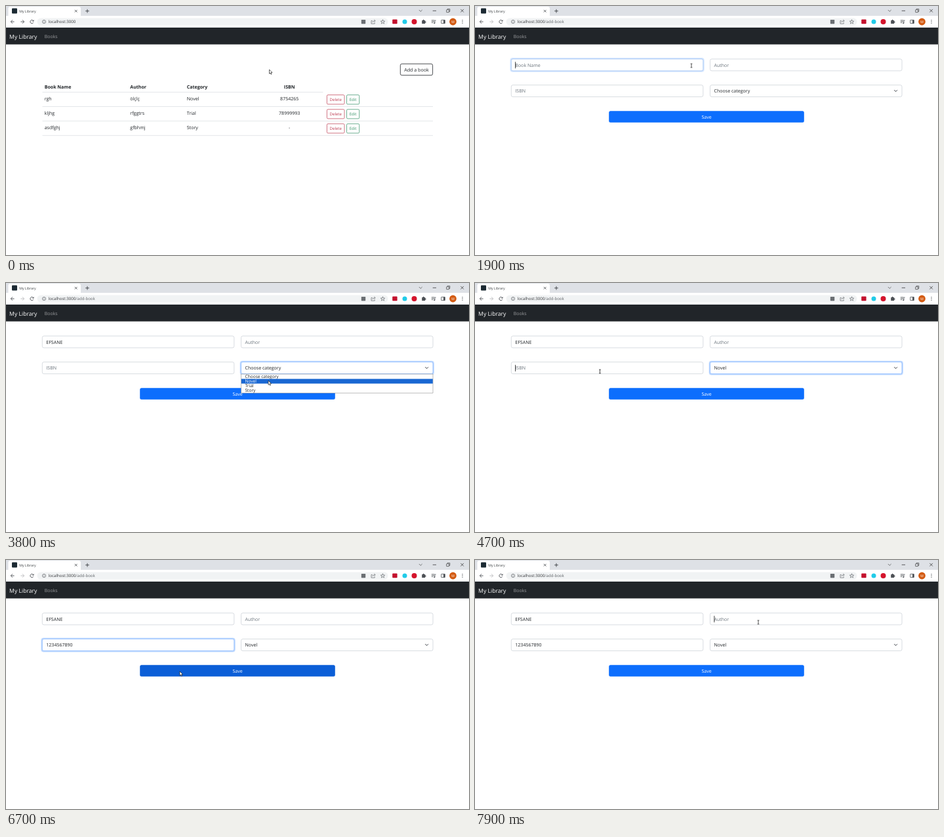
An HTML page with a canvas that plays this animation: 706 by 380 pixels, repeating every 8000 ms.

```html
<!DOCTYPE html>
<html lang="en">
<head>
<meta charset="utf-8">
<title>My Library</title>
<style>
html, body { margin: 0; width: 100%; height: 100%; overflow: hidden; background: #fff; }
canvas { display: block; width: 706px; height: 380px; }
</style>
</head>
<body>
<canvas id="stage"></canvas>
<script>
const W = 706, H = 380, LOOP = 8000, STEP = 100;
const canvas = document.getElementById('stage');
const ctx = canvas.getContext('2d');
const ratio = window.devicePixelRatio || 1;
canvas.width = W * ratio;
canvas.height = H * ratio;

const INK = '#212529', MUTED = '#6c757d', BLUE = '#0d6efd', ICON = '#5f6368';
const BODY = 7.05;

const BOOKS = [
  ['rgh', 'ölçlç', 'Novel', '8754265'],
  ['kljhg', 'rfggtrs', 'Trial', '78999993'],
  ['asdfghj', 'gfbhmj', 'Story', '-']
];
const OPTIONS = ['Choose category', 'Novel', 'Trial', 'Story'];

// time, x, y of the pointer
const PATH = [
  [0, 401.5, 97], [600, 401.5, 97], [1000, 630.5, 98], [1300, 630.5, 98],
  [1500, 592, 95], [1900, 330, 91], [2600, 330, 91], [3200, 389, 138],
  [3500, 405, 132], [3800, 400, 149], [4300, 400, 149], [4700, 190.5, 135],
  [6300, 190.5, 135], [6700, 265, 170], [6800, 265, 168], [7000, 262.5, 48],
  [7200, 340, 60], [7500, 432, 77], [7600, 432, 78], [7800, 432, 95]
];
const NAME_KEYS = [2000, 2100, 2200, 2300, 2400, 2500];
const ISBN_KEYS = [5100, 5100, 5100, 5100, 5300, 5500, 5700, 5900, 6000, 6200];

const clamp = v => Math.max(0, Math.min(1, v));
const ramp = (t, start) => clamp((t - start) / 150);
const between = (t, a, b) => t >= a && t < b;
const typed = (text, keys, t) => text.slice(0, keys.filter(k => k <= t).length);

function mix(a, b, k) {
  return 'rgb(' + a.map((v, i) => Math.round(v + (b[i] - v) * k)).join(',') + ')';
}

function pointerAt(t) {
  const i = PATH.findIndex(p => p[0] > t);
  if (i < 0) return PATH[PATH.length - 1].slice(1);
  const [t0, x0, y0] = PATH[i - 1], [t1, x1, y1] = PATH[i];
  const u = (t - t0) / (t1 - t0), k = u * u * (3 - 2 * u);
  return [x0 + (x1 - x0) * k, y0 + (y1 - y0) * k];
}

function rect(x, y, w, h, color) {
  ctx.fillStyle = color;
  ctx.fillRect(x, y, w, h);
}

function box(x, y, w, h, r, fill, stroke, lw = 0.6) {
  ctx.beginPath();
  ctx.roundRect(x, y, w, h, r);
  if (fill) { ctx.fillStyle = fill; ctx.fill(); }
  if (stroke) { ctx.strokeStyle = stroke; ctx.lineWidth = lw; ctx.stroke(); }
}

function dot(x, y, r, color) {
  ctx.beginPath();
  ctx.arc(x, y, r, 0, Math.PI * 2);
  ctx.fillStyle = color;
  ctx.fill();
}

function line(points, color, lw = 0.8) {
  ctx.beginPath();
  for (let i = 0; i < points.length; i += 2) ctx.lineTo(points[i], points[i + 1]);
  ctx.strokeStyle = color;
  ctx.lineWidth = lw;
  ctx.stroke();
}

function ring(x, y, r, color, lw, from = 0, to = Math.PI * 2) {
  ctx.beginPath();
  ctx.arc(x, y, r, from, to);
  ctx.strokeStyle = color;
  ctx.lineWidth = lw;
  ctx.stroke();
}

function shape(points, fill) {
  ctx.beginPath();
  for (let i = 0; i < points.length; i += 2) ctx.lineTo(points[i], points[i + 1]);
  ctx.closePath();
  ctx.fillStyle = fill;
  ctx.fill();
}

function setFont(size, weight = 400) {
  ctx.font = `${weight} ${size}px "Open Sans", "Noto Sans", sans-serif`;
}

function text(str, x, y, size, color, align = 'left', weight = 400) {
  setFont(size, weight);
  ctx.textAlign = align;
  ctx.fillStyle = color;
  ctx.fillText(str, x, y);
}

function cross(x, y, r, color, lw) {
  line([x - r, y - r, x + r, y + r], color, lw);
  line([x - r, y + r, x + r, y - r], color, lw);
}

function navArrow(x, dir, color) {
  line([x - 2.6 * dir, 24, x + 2.6 * dir, 24], color, 0.9);
  line([x, 21.3, x + 2.7 * dir, 24, x, 26.7], color, 0.9);
}

function drawBrowser(url, canForward) {
  rect(0, 0, W, 15.5, '#dee1e6');
  box(3.5, 1, 110.5, 18, 3, '#fff');
  rect(0, 15, W, 18, '#fff');
  rect(0, 32.3, W, 0.7, '#dfe1e5');
  box(9, 3.6, 8, 8, 1, '#1c2a33');
  text('My Library', 20.2, 9.7, 5.2, '#3c4043');
  cross(106.7, 7.7, 1.8, '#3c4043', 0.8);
  line([121.2, 7.7, 126.8, 7.7], '#3c4043', 0.9);
  line([124, 4.9, 124, 10.5], '#3c4043', 0.9);

  line([629.8, 6, 632.2, 8.4, 634.6, 6], '#444', 0.7);
  line([650.7, 7.3, 656, 7.3], '#222', 0.7);
  box(671.7, 5.8, 3.8, 3.8, 0.3, null, '#222');
  line([673, 5.4, 673, 4.6, 676.8, 4.6, 676.8, 8.4, 676, 8.4], '#222', 0.6);
  cross(695.6, 7.2, 2.3, '#222', 0.7);

  navArrow(10, -1, '#4d5156');
  navArrow(25, 1, canForward ? '#4d5156' : '#babcbe');
  ring(39.5, 24, 2.6, '#4d5156', 0.9, 0.5, 5.5);
  shape([42.5, 20.9, 42.5, 23.6, 39.8, 23.6], '#4d5156');

  box(47.5, 18.6, 535, 11, 5.5, '#f1f3f4');
  ring(58, 24, 2.6, ICON, 0.7);
  rect(57.65, 23.7, 0.7, 1.8, ICON);
  rect(57.65, 22.4, 0.7, 0.7, ICON);
  const cut = 'localhost:3000'.length;
  text(url.slice(0, cut), 64.8, 26.2, 6.15, '#303236');
  const hostWidth = ctx.measureText(url.slice(0, cut)).width;
  text(url.slice(cut), 64.8 + hostWidth, 26.2, 6.15, ICON);

  box(541.8, 20.9, 6.4, 6.4, 0.7, '#6b6f73');
  line([558.7, 22.4, 557, 22.4, 557, 27, 562.2, 27, 562.2, 25.2], ICON, 0.7);
  line([558.8, 25, 559.6, 23.3, 563, 22.6], ICON, 0.7);
  line([561.4, 20.9, 563.2, 22.6, 561.4, 24.2], ICON, 0.7);
  const star = [];
  for (let i = 0; i <= 10; i++) {
    const r = i % 2 ? 1.4 : 3.4, a = i * Math.PI / 5 - Math.PI / 2;
    star.push(574.5 + r * Math.cos(a), 24.2 + r * Math.sin(a));
  }
  line(star, ICON, 0.7);

  box(589.2, 20.6, 7.4, 6.6, 1, '#c3112d');
  dot(608, 24, 3.5, '#21cbe8');
  dot(622.5, 24, 4, '#d4142c');

  box(634.2, 22, 5, 5, 0.6, '#4d5156');
  dot(636.6, 21.8, 1.1, '#4d5156');
  dot(639.5, 24.5, 1.1, '#4d5156');
  for (const y of [21.8, 23.6]) line([648.8, y, 653.6, y], '#4d5156', 0.8);
  line([648.8, 25.4, 651.4, 25.4], '#4d5156', 0.8);
  line([655.7, 22, 654, 22, 654, 25.8], '#4d5156', 0.7);
  dot(653.3, 26, 1.1, '#4d5156');
  box(663.7, 21.4, 5.6, 5.2, 0.4, null, '#4d5156', 0.8);
  rect(667, 21.4, 2.4, 5.2, '#4d5156');

  dot(681.5, 24, 5.4, '#d35b13');
  text('M', 681.5, 25.8, 5, '#fff', 'center');
  for (const y of [21.7, 24, 26.3]) dot(696, y, 0.65, '#4d5156');
}

function drawNavbar(width) {
  rect(0, 33, width, 25.6, INK);
  text('My Library', 5.1, 49.5, 8.65, '#fff');
  text('Books', 58.8, 48.9, 6.95, '#9b9d9f');
}

function smallButton(x, y, w, label, color) {
  box(x, y, w, 14.2, 1.6, null, color, 0.7);
  text(label, x + w / 2, y + 9.3, 6.05, color, 'center');
}

function drawTable(hover) {
  const dark = [33, 37, 41], light = [255, 255, 255];
  box(601.3, 88.3, 49.3, 17.4, 2.4, mix(light, dark, hover), INK, 0.8);
  text('Add a book', 626, 99.8, 7.12, mix(dark, light, hover), 'center');

  const cols = [58.7, 189.3, 275.8, 432.2];
  const row = (cells, y, weight) => cells.forEach((c, i) =>
    text(c, cols[i], y, BODY, INK, i === 3 ? 'center' : 'left', weight));
  row(['Book Name', 'Author', 'Category', 'ISBN'], 125.6, 700);
  rect(55.5, 131.3, 428, 0.7, '#d9dde1');
  BOOKS.forEach((cells, i) => {
    const y = i * 22.05;
    row(cells, 144.3 + y);
    smallButton(489.4, 135.7 + y, 26.6, 'Delete', '#bd3a50');
    smallButton(519.5, 135.7 + y, 19.2, 'Edit', '#2f8f63');
    rect(55.5, 153.3 + y, 595.5, 0.7, '#d9dde1');
  });
}

function drawSpinner(t) {
  const turn = (t - 1200) / 750 * Math.PI * 2;
  ring(352.5, 232.7, 12.5, INK, 2, turn + 0.9, turn + 5.64);
  rect(698, 33, 8, H - 33, '#f1f1f1');
  rect(699, 41, 6, 309, '#c1c1c1');
  shape([702, 36, 704, 38.4, 700, 38.4], '#505050');
  shape([702, 377.4, 704, 375, 700, 375], '#505050');
}

function field(x, y, value, hint, focus, caret) {
  if (focus > 0) box(x - 0.9, y - 0.9, 294.3, 19.8, 3, null, `rgba(13,110,253,${0.27 * focus})`, 1.9);
  box(x, y, 292.5, 18, 2.5, '#fff', mix([206, 212, 218], [134, 183, 254], focus), 0.8);
  text(value || hint, x + 6, y + 11.8, BODY, value ? INK : MUTED);
  if (caret) {
    const w = value ? ctx.measureText(value).width : 0;
    rect(x + 6 + w, y + 4.3, 0.8, 10, '#111');
  }
}

function drawForm(t, py) {
  const nameRing = ramp(t, 1800) - ramp(t, 3500);
  const selectRing = ramp(t, 3500) - ramp(t, 4700);
  const isbnRing = ramp(t, 4700) - 0.5 * ramp(t, 6700) - 0.5 * ramp(t, 7500);
  const chosen = t >= 4000 ? 'Novel' : 'Choose category';

  field(55.3, 80.9, typed('EFSANE', NAME_KEYS, t), 'Book Name', nameRing, between(t, 1900, 3500));
  field(358.5, 80.9, '', 'Author', ramp(t, 7900), t >= 7900);
  field(55.3, 120.6, typed('1234567890', ISBN_KEYS, t), 'ISBN', isbnRing, between(t, 4700, 6700));
  field(358.5, 120.6, chosen, '', selectRing, false);
  line([639.3, 128.3, 641.6, 130.6, 643.9, 128.3], '#343a40', 1);

  const pressed = between(t, 6600, 7600);
  box(204.2, 160.3, 297.6, 17.5, 2.5, pressed ? '#0b5ed7' : BLUE);
  text('Save', 353, 171.8, 7, '#fff', 'center');

  if (between(t, 3600, 4000)) {
    box(358.5, 139, 292.5, 29, 0, '#fff', '#767676', 0.5);
    const active = py > 146 ? 1 : 0;
    OPTIONS.forEach((label, i) => {
      const y = 139.2 + i * 7.15;
      if (i === active) rect(358.8, y, 292, 7.15, '#1967d2');
      text(label, 364.5, y + 5.8, 6.6, i === active ? '#fff' : INK);
    });
  }
}

function drawDialog() {
  ctx.save();
  ctx.shadowColor = 'rgba(0,0,0,0.35)';
  ctx.shadowBlur = 3 * ratio;
  ctx.shadowOffsetY = ratio * 0.7;
  box(250, 31, 206, 60.3, 2, '#fff');
  ctx.restore();
  box(250, 31, 206, 60.3, 2, null, '#c4c6c9', 0.5);
  text('localhost:3000 web sitesinin mesajı', 257.2, 46.3, 6.45, '#202124');
  text('Bookname, Author and Category cannot be left blank', 257.1, 59.6, 5.68, '#3c4043');
  box(415.4, 68.8, 33.3, 14.8, 2, '#fff', '#5f9bee', 1.1);
  box(416.5, 69.9, 31.1, 12.6, 1.4, '#1a66d0');
  text('Tamam', 432, 78.1, 5.05, '#fff', 'center', 600);
}

function drawArrow(x, y) {
  ctx.beginPath();
  [[0, 0], [0, 6.4], [1.5, 5.1], [2.5, 7.3], [3.5, 6.9], [2.5, 4.7], [4.5, 4.5]]
    .forEach(p => ctx.lineTo(x + p[0], y + p[1]));
  ctx.closePath();
  ctx.fillStyle = '#fff';
  ctx.fill();
  ctx.strokeStyle = '#222';
  ctx.lineWidth = 0.7;
  ctx.stroke();
}

function drawBeam(x, y) {
  line([x, y - 2.9, x, y + 2.9], '#222', 0.8);
  for (const d of [-2.9, 2.9]) line([x - 1.4, y + d, x + 1.4, y + d], '#222', 0.7);
}

function overField(x, y) {
  const left = x > 55 && x < 348, right = x > 358 && x < 651;
  return (y > 80 && y < 99 && (left || right)) || (y > 120 && y < 139 && left);
}

function draw(t) {
  ctx.setTransform(ratio, 0, 0, ratio, 0, 0);
  ctx.textRendering = 'geometricPrecision';
  rect(0, 0, W, H, '#fff');
  const listed = t < 1100, loading = between(t, 1100, 1500);
  const dialog = between(t, 6900, 7600);
  const [px, py] = pointerAt(t);

  drawBrowser(listed ? 'localhost:3000' : 'localhost:3000/add-book', listed);
  drawNavbar(loading ? 698 : W);
  if (listed) drawTable(ramp(t, 850));
  else if (loading) drawSpinner(t);
  else drawForm(t, py);
  if (dialog) drawDialog();

  if (t >= 1500 && !dialog && !between(t, 3600, 4000) && overField(px, py)) drawBeam(px, py);
  else drawArrow(px, py);
}

const begin = performance.now();
function tick() {
  const t = (performance.now() - begin) % LOOP;
  draw(Math.floor(t / STEP) * STEP);
  requestAnimationFrame(tick);
}
tick();
</script>
</body>
</html>
```
